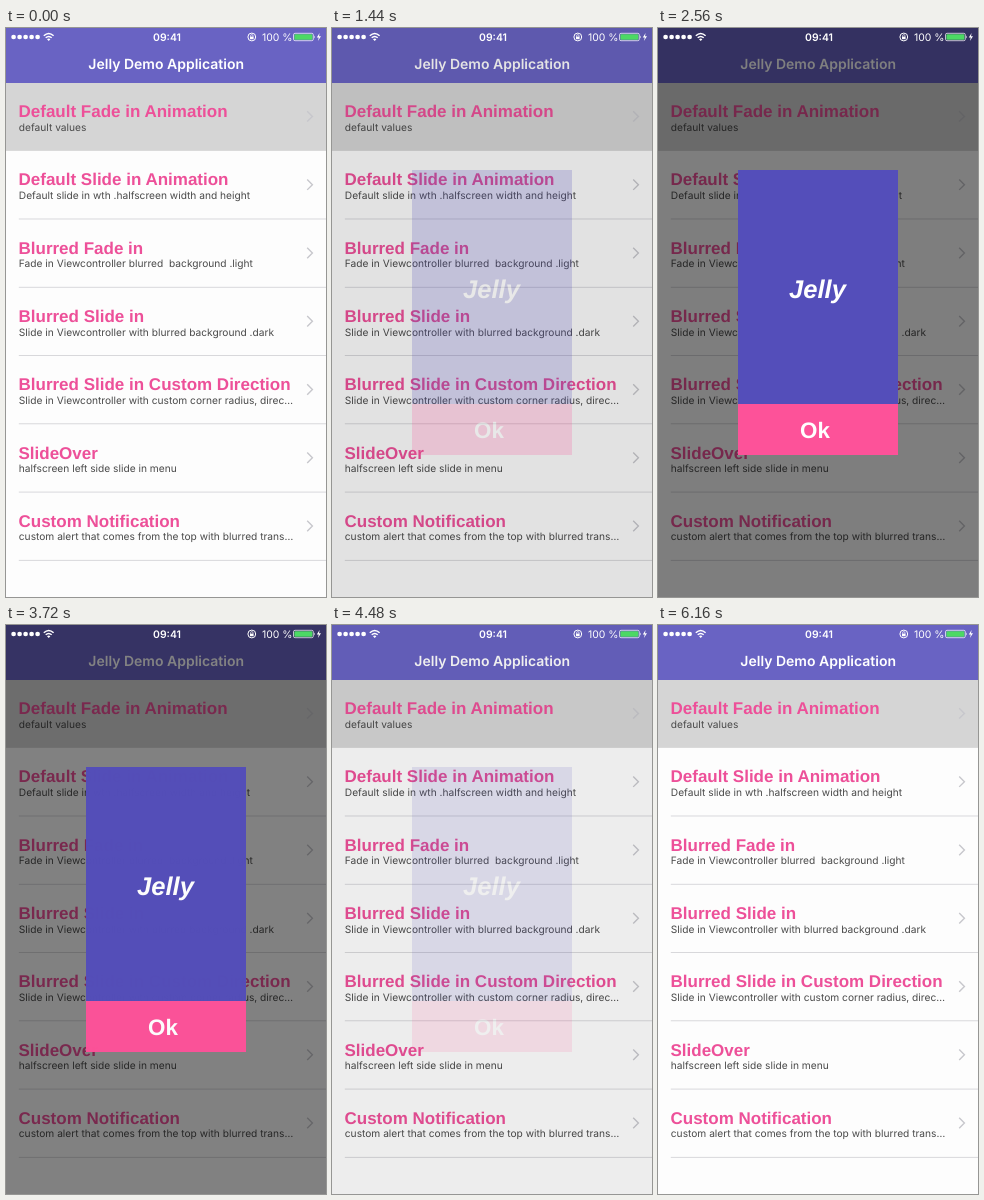
Animation of 320 by 569 pixels, one loop 6240 ms. Source, as an HTML page:

```html
<!DOCTYPE html>
<html lang="en">
<head>
<meta charset="utf-8">
<title>Jelly Demo Application</title>
<style>
  html, body { margin: 0; width: 100%; height: 100%; overflow: hidden; background: #fdfdfd; }
  svg { display: block; width: 100%; height: 100%; }
  text { white-space: pre; font-family: Inter, Roboto, sans-serif; text-rendering: geometricPrecision; }
  .title, .big { font-family: "Liberation Sans", Arial, sans-serif; font-weight: 700; }
  .title { font-size: 17px; fill: #ed5099; }
  .sub { font-size: 10.2px; fill: #4a4a4a; }
  .nav { font-size: 14px; font-weight: 600; fill: #fff; }
  .status { font-size: 10.4px; fill: #fff; }
  .line { fill: none; stroke-width: 1.4; stroke: #c7c7cc; }
  .mid { text-anchor: middle; }
</style>
</head>
<body>
<svg viewBox="0 0 320 569" preserveAspectRatio="none">
  <rect width="320" height="569" fill="#fdfdfd"/>
  <g id="rows"></g>
  <rect width="320" height="55" fill="#6963c3"/>
  <text class="nav mid" x="160.2" y="41">Jelly Demo Application</text>
  <rect id="dim" width="320" height="569" opacity="0"/>
  <g id="popup" opacity="0">
    <rect x="80" y="142" width="160" height="234.5" fill="#544eba"/>
    <rect x="80" y="376" width="160" height="51" fill="#fd5299"/>
    <text class="big mid" x="159.5" y="270" font-size="25.6" font-style="italic" fill="#fff">Jelly</text>
    <text class="big mid" x="157" y="410" font-size="22.4" fill="#fff">Ok</text>
  </g>
  <g id="status" fill="#fff">
    <g fill="none" stroke="#fff" stroke-width="1.5">
      <path d="M37.8 7.8Q42.7 3.2 47.6 7.8M39.7 9.8Q42.7 7.1 45.7 9.8"/>
      <circle cx="245.8" cy="9" r="3.9" stroke-width="1"/>
      <rect x="287.5" y="5.3" width="19.8" height="7.4" rx="1.5" stroke-width=".7"/>
    </g>
    <path d="M41 11.2Q42.7 9.8 44.4 11.2L42.7 13Z"/>
    <path d="M244 8.6h3.6v2.6h-3.6z"/>
    <path d="M244.6 8.8V7.8a1.2 1.2 0 0 1 2.4 0V8.8" fill="none" stroke="#fff" stroke-width=".7"/>
    <rect x="288.4" y="6.2" width="18" height="5.6" rx=".8" fill="#4cd964"/>
    <path d="M308.2 7.6q1.5 1.4 0 2.8z"/>
    <path d="M313.6 5L310.8 9.6H312.8L311.9 13L315 8.3H313Z"/>
    <text class="status mid" x="161" y="12.8" font-weight="600">09:41</text>
    <text class="status" x="256" y="12.8">100 %</text>
  </g>
</svg>
<script>
  const LOOP = 6240, FADE = 960, SHOW = 1190, HIDE = 3690;
  const TOP = 54.6, ROW = 68.27;
  const items = [
    ["Default Fade in Animation", "default values"],
    ["Default Slide in Animation", "Default slide in wth .halfscreen width and height"],
    ["Blurred Fade in", "Fade in Viewcontroller blurred  background .light"],
    ["Blurred Slide in", "Slide in Viewcontroller with blurred background .dark"],
    ["Blurred Slide in Custom Direction", "Slide in Viewcontroller with custom corner radius, direc…"],
    ["SlideOver", "halfscreen left side slide in menu"],
    ["Custom Notification", "custom alert that comes from the top with blurred trans…"]
  ];
  const get = id => document.getElementById(id);

  get("rows").innerHTML = items.map(([title, sub], i) => {
    const y = TOP + i * ROW;
    const back = i
      ? `<rect x="12.8" y="${y + ROW - .6}" width="308" height=".9" fill="#d4d4d8"/>`
      : `<rect y="${y}" width="320" height="${ROW}" fill="#d5d5d5"/>`;
    return `${back}
      <text class="title" x="12.5" y="${y + 34.6}">${title}</text>
      <text class="sub" x="12.8" y="${y + 48.2}">${sub}</text>
      <path class="line" d="M301.2 ${y + 28.6}l5.2 5.2l-5.2 5.2"/>`;
  }).join("");

  get("status").insertAdjacentHTML("beforeend",
    [0, 1, 2, 3, 4].map(i => `<circle cx="${7.6 + i * 6}" cy="9" r="2.35"/>`).join(""));

  // Gentle ease in and out
  function ease(x) {
    x = Math.min(1, Math.max(0, x));
    return (x + x * x * (3 - 2 * x)) / 2;
  }

  function draw() {
    const t = performance.now() % LOOP;
    const alpha = ease((t - SHOW) / FADE) - ease((t - HIDE) / FADE);
    get("popup").setAttribute("opacity", alpha);
    get("dim").setAttribute("opacity", alpha / 2);
    requestAnimationFrame(draw);
  }
  draw();
</script>
</body>
</html>
```
